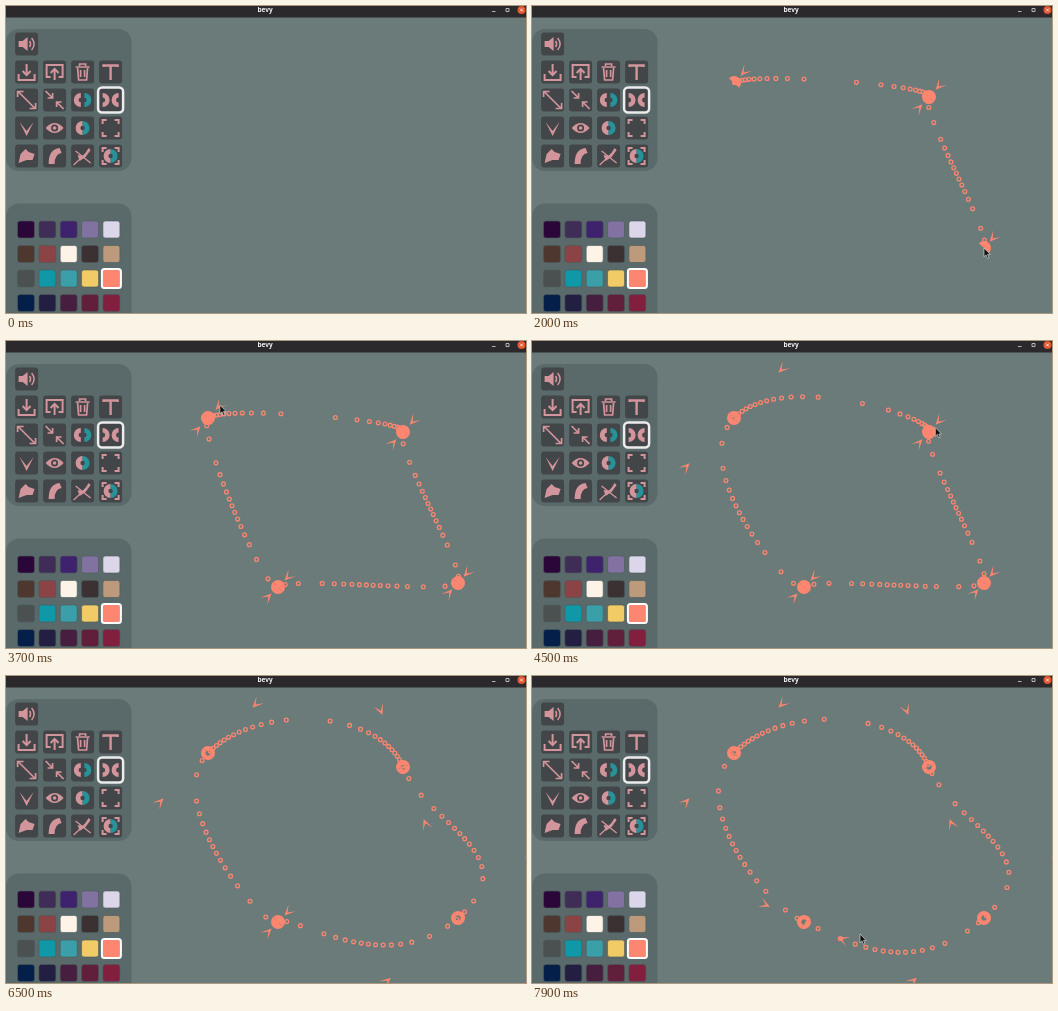
Recreate the animation shown at these times as an HTML page. Size 520 px wide and 307 px high, loop 8000 ms.

```html
<!DOCTYPE html>
<html lang="en">
<head>
<meta charset="utf-8">
<title>bevy</title>
<style>
  html, body { margin: 0; width: 100%; height: 100%; overflow: hidden; background: #6a7b7a; }
  svg { display: block; width: 520px; height: 307px; }
</style>
</head>
<body>
<svg viewBox="0 0 520 307">
  <rect width="520" height="307" fill="#6a7b7a"/>
  <rect y="23" width="125.5" height="142" rx="13" fill="#5a6a6a"/>
  <rect y="197.500" width="125.500" height="130" rx="13" fill="#5a6a6a"/>
  <g id="buttons"></g>
  <g id="palette"></g>
  <g id="scene"></g>
  <g id="titlebar">
    <rect width="520" height="11.500" fill="#2b292b"/>
    <text x="259" y="6.300" font-family="'Open Sans', 'Noto Sans', sans-serif" font-size="6.500" font-weight="700" fill="#f2f2f2" text-anchor="middle">bevy</text>
    <path d="M486 5.500h3.500M500 2.500h3v3h-3z" fill="none" stroke="#d8d8d8" stroke-width=".8"/>
    <circle cx="515.500" cy="4" r="4" fill="#e2562e"/>
    <path d="M514 2.500l3 3m0-3l-3 3" stroke="#fff" stroke-width=".8"/>
  </g>
  <path id="cursor" d="M0 0V8.700L2 6.900L3.500 10.300L5 9.600L3.500 6.400H6.200Z" fill="#111" stroke="#e8e8e8" stroke-width=".6"/>
</svg>
<script>
const LOOP = 8000;
const CORAL = '#fc8670', PINK = '#d3959c', TEAL = '#27929a';
const $ = id => document.getElementById(id);

// ---- Toolbar ----
const half = (side, color, x = 0, hole = 2.2) =>
  `<path transform="translate(${x})" fill="${color}" d="M0 -7A7 7 0 0 ${side} 0 7V${hole}A${hole} ${hole} 0 0 ${1 - side} 0 ${-hole}Z"/>`;
const line = (d, w = 2) => `<path d="${d}" fill="none" stroke="${PINK}" stroke-width="${w}"/>`;
const solid = d => `<path d="${d}" fill="${PINK}"/>`;
const corners = line('M-8 -4V-8H-4M4 -8H8V-4M8 4V8H4M-4 8H-8V4');
const disc = half(0, PINK) + half(1, TEAL);

const icons = [
  [0, 0, solid('M-8 -3H-4L1 -7V7L-4 3H-8Z') + line('M3 -3Q5 0 3 3M5 -6Q10 0 5 6', 1.5)],
  [0, 1, line('M-8 2V8H8V2M0 -8V2') + line('M-4 -1L0 3L4 -1')],
  [1, 1, line('M-4 5H-8V-7H8V5H4M0 8V-2') + line('M-4 1L0 -3L4 1')],
  [2, 1, line('M-7 -5H7M-3 -6V-8H3V-6M-5 -4L-4 8H4L5 -4M-2 -2V5M2 -2V5', 1.7)],
  [3, 1, line('M-7 -5V-6.500H7V-5M0 -6V8', 2.4)],
  [0, 2, line('M-8 -8L8 8M-9 -3V-8.500H-3M9 3V8.500H3', 1.7)],
  [1, 2, line('M-9 -9L-2 -2M9 9L2 2M-7 -2H-2V-7M7 2H2V7', 1.7)],
  [2, 2, half(0, PINK, -1.8) + half(1, TEAL, 1.8)],
  [3, 2, half(1, PINK, -8, 2.5) + half(0, PINK, 8, 2.5)],
  [0, 3, solid('M0 8L-7 -6L0 3L7 -6Z')],
  [1, 3, solid('M-9 0Q0 -10 9 0Q0 10 -9 0Z') + '<circle r="3.500" fill="#424648"/>' + `<circle r="1.800" fill="${PINK}"/>`],
  [2, 3, disc],
  [3, 3, corners],
  [0, 4, solid('M-8 7L-6 -2L-1 -7L2 -4L8 -2L6 4L0 4Z')],
  [1, 4, solid('M-6 8Q-6 -7 5 -8L7 -3Q0 -2 0 8Z')],
  [2, 4, line('M-9 9L7 -6M-7 -5L8 7', 1.3) + solid('M-3 5L-5 -1L1 0L6 -8L8 -6L3 1Z')],
  [3, 4, corners + disc],
];
$('buttons').innerHTML = icons.map(([col, row, art]) => {
  const chosen = col === 3 && row === 2;
  const frame = chosen
    ? '<rect x="-12.500" y="-12.500" width="25" height="25" rx="4" fill="#424648" stroke="#ececec" stroke-width="2.500"/>'
    : '<rect x="-11.500" y="-11.500" width="23" height="23" rx="3" fill="#424648"/>';
  return `<g transform="translate(${20.6 + 28 * col} ${38 + 28 * row})">${frame}${art}</g>`;
}).join('');

// ---- Palette ----
const swatches = [
  '#2b0638', '#402d57', '#3f226e', '#8272a2', '#dcd6ea',
  '#4e372f', '#8c4345', '#fdf3e7', '#3b3032', '#bd9a7c',
  '#4b5151', '#0e98a8', '#3a9fa9', '#f1cc66', CORAL,
  '#04204a', '#221f42', '#461f40', '#621f3c', '#821f3e',
];
$('palette').innerHTML = swatches.map((color, i) => {
  const x = 20 + 21.35 * (i % 5), y = 223.5 + 24.5 * Math.floor(i / 5);
  const edge = color === CORAL ? 'stroke="#fff" stroke-width="2"' : 'stroke="#4c5a5a" stroke-width=".6"';
  const size = color === CORAL ? 19 : 17;
  return `<rect x="${x - size / 2}" y="${y - size / 2}" width="${size}" height="${size}" rx="2.500" fill="${color}" ${edge}/>`;
}).join('');

// ---- Spline: each outgoing handle mirrors the incoming one ----
const nodes = [
  { at: [202, 77], short: [11, -12], long: [49, -50], pull: [3650, 4200] },
  { at: [397, 91], short: [-11, 12], long: [23, 58], pull: [4620, 5150] },
  { at: [452, 242], short: [-10, 11], long: [-72, 64], pull: [5700, 6300] },
  { at: [272, 246], short: [-11, 11], long: [-40, -18], pull: [7150, 7700] },
];
const draws = [[150, 1000], [1250, 1900], [2100, 2750], [2950, 3500]];
const pointer = [
  [150, 202, 77], [1000, 397, 91], [1250, 397, 91], [1900, 452, 242], [2100, 452, 242],
  [2750, 271, 246], [2950, 271, 246], [3500, 202, 77], [3650, 213, 65], [4200, 251, 27],
  [4480, 403, 87], [4620, 408, 79], [5150, 374, 33], [5600, 475, 233], [5700, 462, 231],
  [6300, 524, 178], [6700, 524, 178], [7150, 283, 235], [7700, 312, 265], [7900, 328, 258],
];

const add = (a, b, k = 1) => [a[0] + k * b[0], a[1] + k * b[1]];
const mix = (a, b, k) => [a[0] + (b[0] - a[0]) * k, a[1] + (b[1] - a[1]) * k];
const ease = (t, from, to) => {
  const k = Math.min(1, Math.max(0, (t - from) / (to - from)));
  return k * k * (3 - 2 * k);
};
const power = (w, p) => Math.sign(w) * Math.abs(w) ** p;
const n = v => v.toFixed(2);

function bezier([a, b, c, d], u) {
  const v = 1 - u;
  return [0, 1].map(i => v * v * v * a[i] + 3 * v * v * u * b[i] + 3 * v * u * u * c[i] + u * u * u * d[i]);
}

function byLength(curve) {
  const steps = 60, pts = [], total = [0];
  for (let i = 0; i <= steps; i++) {
    pts.push(bezier(curve, i / steps));
    if (i) total.push(total[i - 1] + Math.hypot(...add(pts[i], pts[i - 1], -1)));
  }
  return s => {
    const goal = s * total[steps];
    let i = 1;
    while (i < steps && total[i] < goal) i++;
    return mix(pts[i - 1], pts[i], (goal - total[i - 1]) / (total[i] - total[i - 1] || 1));
  };
}

// Beads rush through the middle of the first curve...
function centreGap(curve, phase) {
  const pts = [];
  for (let w = -14 + phase; w < 13.5; w++)
    if (w > -13.5) pts.push(bezier(curve, .5 + .136 * power(w, .5)));
  return pts;
}

// ...and through a spot near each end of the others.
function endGaps(curve, phase) {
  const place = byLength(curve), outer = 2.17, mid = 8.02, pts = [];
  const side = j => .172 + .104 * power(j - outer, .65);
  for (let j = (phase - .2 + outer + 10) % 1; j < 2 * mid; j++)
    pts.push(place(Math.max(0, j < mid ? side(j) : 1 - side(2 * mid - j))));
  return pts;
}

const bead = p => `<circle cx="${n(p[0])}" cy="${n(p[1])}" r="1.900" fill="none" stroke="${CORAL}" stroke-width="1.300"/>`;

function knob(at, offset) {
  const angle = Math.atan2(offset[1], offset[0]) * 180 / Math.PI;
  const hole = Math.hypot(...offset) > 25 ? 2.6 : 0;
  const tip = add(at, offset);
  return `<g transform="translate(${n(at[0])} ${n(at[1])}) rotate(${n(angle)})">${half(1, CORAL, 0, hole)}</g>` +
    `<path transform="translate(${n(tip[0])} ${n(tip[1])}) rotate(${n(angle + 180)})" d="M6.500 0L-4.500 -5L2 0L-4.500 5Z" fill="${CORAL}"/>`;
}

function pointerAt(t) {
  const i = pointer.findIndex(p => p[0] > t);
  if (i < 0) return pointer[pointer.length - 1].slice(1);
  const a = pointer[i - 1], b = pointer[i];
  return mix(a.slice(1), b.slice(1), ease(t, a[0], b[0]));
}

function render(t) {
  const sec = t / 1000 - 4.5;
  const flow = .05 + sec * (sec < 0 ? 5.95 : 6.08);
  const phase = flow - Math.floor(flow);
  const handles = nodes.map(k => mix(k.short, k.long, ease(t, ...k.pull)));

  $('scene').innerHTML = draws.map(([from, to], i) => {
    if (t < from) return '';
    const j = (i + 1) % 4;
    const start = nodes[i].at, end = mix(start, nodes[j].at, ease(t, from, to));
    const out = handles[i], back = handles[j].map(v => -v);
    const curve = [start, add(start, out), add(end, back), end];
    const beads = (i ? endGaps : centreGap)(curve, phase);
    return knob(start, out) + knob(end, back) + beads.map(bead).join('');
  }).join('');

  const shown = t >= pointer[0][0];
  $('cursor').setAttribute('visibility', shown ? 'visible' : 'hidden');
  if (shown) $('cursor').setAttribute('transform', `translate(${pointerAt(t).map(n).join(' ')})`);
}

const began = performance.now();
function tick() {
  render((performance.now() - began) % LOOP);
  requestAnimationFrame(tick);
}
tick();
</script>
</body>
</html>
```
